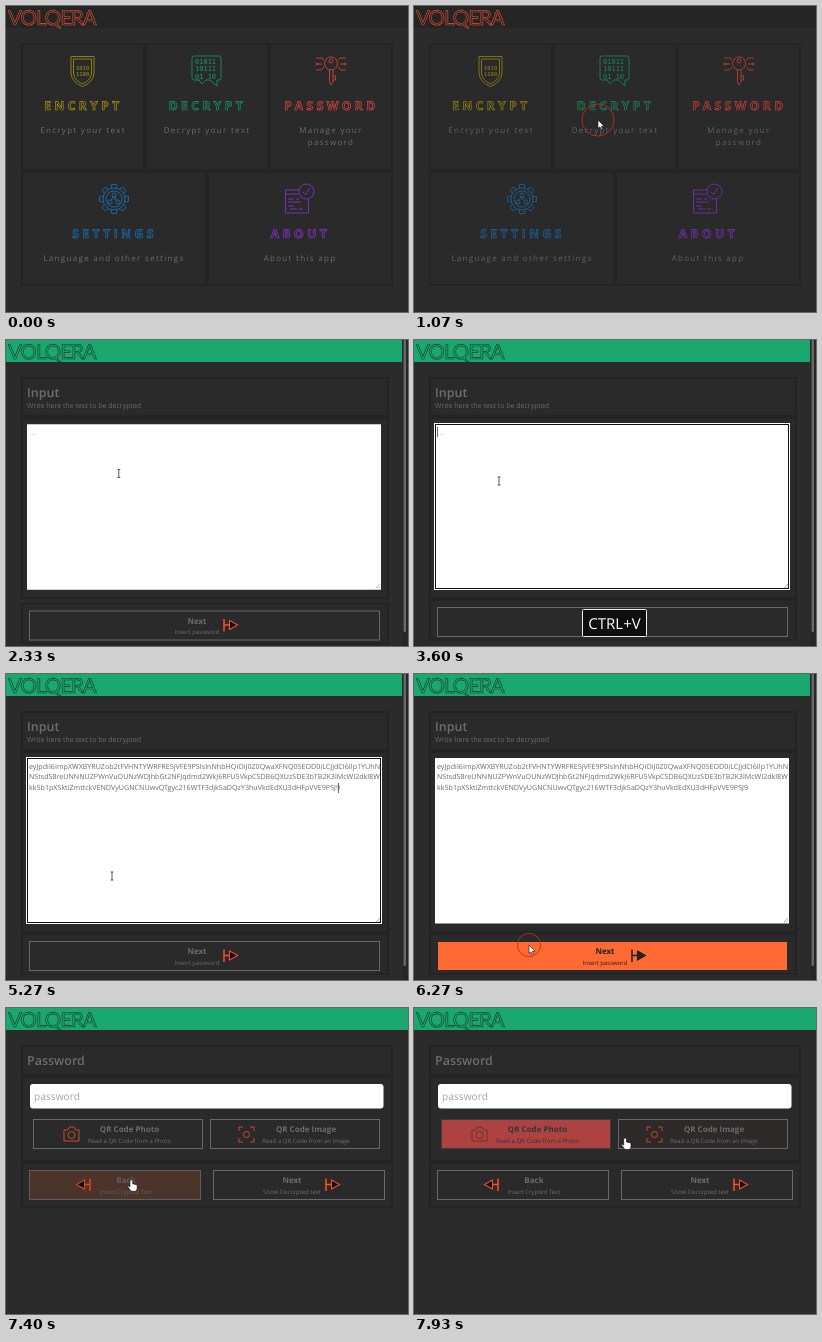
Animation, 402 px wide and 306 px high, one loop 8 s. Source, as an HTML page:

```html
<!DOCTYPE html>
<html lang="en">
<head>
<meta charset="utf-8">
<title>Text encryption app</title>
<style>
html, body { margin: 0; width: 100%; height: 100%; overflow: hidden; background: #2b2b2b; }
svg { display: block; width: 402px; height: 306px; font-family: "Open Sans", "Noto Sans", sans-serif; text-rendering: geometricPrecision; }
.panel { fill: #2a2a2a; stroke: #242424; stroke-width: 2; }
.line { fill: none; stroke-width: .8; }
.mid { text-anchor: middle; }
.gray { fill: #6c6c6c; }
.note { font-size: 8px; letter-spacing: 1.3px; }
.card { font-size: 12px; font-weight: 700; letter-spacing: 3.5px; stroke-width: .7; fill: #2a2a2a; }
.bits { font-family: "DejaVu Sans Mono", monospace; stroke: none; }
.head { font-size: 12.5px; font-weight: 600; }
.name { font-size: 8px; font-weight: 700; }
.hint { font-size: 6px; }
</style>
</head>
<body>
<svg id="stage" viewBox="0 0 402 306"></svg>
<script>
const LOOP = 8000, RED = '#f4502f', PASTE = 3730, PRESS = 6190;
const stage = document.getElementById('stage');

const panel = (x, y, w, h, id = '') => `<rect id="${id}" class="panel" x="${x}" y="${y}" width="${w}" height="${h}"/>`;
const text = (x, y, s, cls, extra = '') => `<text x="${x}" y="${y}" class="${cls}" ${extra}>${s}</text>`;
const group = (id, inner) => `<g id="${id}">${inner}</g>`;
const at = (x, y, inner, flip = '', extra = '') => `<g transform="translate(${x} ${y}) ${flip}" ${extra}>${inner}</g>`;

// Menu card: icon, outlined title, note lines
function card(x, y, w, h, color, icon, ix, title, ...notes) {
  const c = x + w / 2, low = y + 66;
  return panel(x, y, w, h) +
    at(ix, y + 12, icon(color), '', `class="line" stroke="${color}"`) +
    text(c + 0.5, low, title, 'card mid', `stroke="${color}"`) +
    notes.map((s, i) => text(c, low + 23 + 12 * i, s, 'note gray mid')).join('');
}

const bits = (x, y, size, color, ...rows) =>
  rows.map((s, i) => text(x, y + i * size * 1.1, s, 'bits', `font-size="${size}" fill="${color}"`)).join('');
const teeth = Array.from({length: 8}, (_, i) => `<path transform="rotate(${i * 45} 15 15)" d="M12 4.5L12.6 .5H17.4L18 4.5"/>`).join('');

const shield = c => '<path d="M.5 .5H23.5V17Q23 26 12 30.5Q1 26 .5 17ZM3 3H21V17Q20.5 24 12 28Q3.5 24 3 17Z"/>' +
  bits(5.5, 14, 5.5, c, '1010', '1100');
const bubble = c => '<path d="M8 24H2Q0 24 0 22V2Q0 0 2 0H27Q29 0 29 2V22Q29 24 27 24H25V30L18 24H14L10 28L7 24"/>' +
  bits(3, 7.5, 7, c, '01011', '10111', '01 10');
const key = () => '<path d="M13.5 14V26L15 29L17 26V14M17 20H19.5V24H17M0 2H6L8 4M2 8H6M0 14H5L8 11M30 2H24L22 4M28 8H24M30 14H25L22 11"/>' +
  '<circle cx="15" cy="7.5" r="6.5"/><circle cx="15" cy="5" r="2"/><circle cx="1" cy="8" r="1"/><circle cx="29" cy="8" r="1"/>';
const gear = () => '<circle cx="15" cy="15" r="11"/><circle cx="15" cy="15" r="8"/>' + teeth +
  '<circle cx="15" cy="11" r="2"/><circle cx="11" cy="18" r="2"/><circle cx="19" cy="18" r="2"/><path d="M15 13V16M12 16L14 13M18 16L16 13"/>';
const sheet = () => '<path d="M14 6H.5V29H23.5V15M.5 10H13M3 15H9M11 15H14M3 18H16M3 22H9M5 25H12M14 25H18"/>' +
  '<circle cx="21.5" cy="7.5" r="7.5"/><path d="M18 8L20.5 10.5L25 4"/>';

const arrow = (c, fill) => `<path d="M1 .5V13M1 6.5H8" stroke="${c}" stroke-width="1.5"/><path d="M6.5 2L14.5 6.5L6.5 11Z" fill="${fill}" stroke="${c}" stroke-width="1.1"/>`;
const camera = c => `<path class="line" stroke="${c}" d="M0 3H4L5.5 0H10L11.5 3H15V14H0Z"/><circle class="line" stroke="${c}" cx="7.5" cy="8" r="3.5"/>`;
const scan = c => `<path class="line" stroke="${c}" d="M0 4V0H4M11 0H15V4M15 11V15H11M4 15H0V11"/><circle class="line" stroke="${c}" cx="7.5" cy="7.5" r="3"/>`;

// A button holds a plain look and a hover look on top of it
function button(id, x, y, w, h, c, title, hint, icon, ix, hot, flip = '') {
  const look = (ink, mark, fill) =>
    text(c, y + 13, title, 'name mid', `fill="${ink}"`) + text(c, y + 23.5, hint, 'hint mid', `fill="${ink}"`) +
    at(ix, y + 8, icon(mark, fill), flip);
  const box = paint => `<rect x="${x + .5}" y="${y + .5}" width="${w - 1}" height="${h - 1}" ${paint}/>`;
  return box('fill="none" stroke="#686868"') + look('#6c6c6c', RED, '#000') +
    group(id, box(`fill="${hot}" stroke="#2b2b2b"`) + look('#222', '#222', '#222'));
}

const cipher = [
  'eyJpdiI6ImpXWXBYRUZob2tFVHNTYWRFRE5jVFE9PSIsInNhbHQiOiJ0Z0QwaXFNQ05EOD0iLCJjdCI6Ilp1YUhN',
  'NStsdS8reUNNNUZPWnVuOUNzWDJhbGt2NFJqdmd2WkJ6RFU5VkpCSDB6QXUzSDE3bTB2K3lMcWI2dkl8W',
  'kk5b1pXSktiZmttckVENDVyUGNCNUwvQTgyc216WTF3djk5aDQzY3huVkdEdXU3dHFpVVE9PSJ9'
];

const menu =
  card(16, 38, 122, 126, '#a8960c', shield, 64.5, 'ENCRYPT', 'Encrypt your text') +
  card(140, 38, 122, 126, '#159c69', bubble, 186, 'DECRYPT', 'Decrypt your text') +
  card(264, 38, 122, 126, '#e5453d', key, 310, 'PASSWORD', 'Manage your', 'password') +
  card(16, 166, 184, 113, '#1673bd', gear, 93, 'SETTINGS', 'Language and other settings') +
  card(202, 166, 184, 113, '#8c32dc', sheet, 279, 'ABOUT', 'About this app');

const input =
  group('in0', panel(16, 38, 366, 38) + text(21, 57, 'Input', 'head gray') +
    text(21, 68, 'Write here the text to be decrypted', 'gray', 'font-size="7"')) +
  group('in1', panel(16, 78, 366, 180) +
    '<rect x="21" y="84" width="354" height="165.5" fill="#fff"/>' +
    '<g id="focus" fill="none"><rect x="20.5" y="83.5" width="355" height="166" stroke="#fff"/><rect x="21.5" y="84.5" width="353" height="164" stroke="#111"/></g>' +
    '<path d="M370 248L374 244M372.5 248L374 246.5" stroke="#888" stroke-width=".7"/>' +
    text(24, 94.6, '...', '', 'id="dots" font-size="7" fill="#aaa"') +
    group('paste', cipher.map((s, i) => text(23, 94.6 + i * 10.7, s, '', 'font-size="7.13" fill="#6a6a6a"')).join('')) +
    '<rect id="caret" width="1" height="10" fill="#666"/>') +
  group('in2', panel(16, 260, 366, 40) +
    button('hotNext', 23, 267, 351, 30, 191, 'Next', 'Insert password', arrow, 217, '#ff6a33'));

const password =
  group('pw0', panel(16, 38, 370, 29) + text(21, 56.5, 'Password', 'head gray')) +
  group('pw1', panel(16, 69, 370, 84, 'pwBox') + '<rect x="24" y="76" width="353.5" height="24.5" rx="3" fill="#fff"/>' +
    text(28, 92, 'password', '', 'font-size="10.2" fill="#a0a3aa"') +
    group('pw2',
      button('hotPhoto', 27, 111, 170, 30, 123.5, 'QR Code Photo', 'Read a QR Code from a Photo', camera, 58, '#e04c4c') +
      button('hotImage', 204, 111, 170, 30, 300, 'QR Code Image', 'Read a QR Code from an Image', scan, 233, '#e04c4c'))) +
  group('pw3', panel(16, 155, 370, 44) +
    button('hotBack', 23, 162, 172, 30, 120, 'Back', 'Insert Crypted Text', arrow, 85, '#ff6a33', 'scale(-1 1)') +
    button('hotShow', 207, 162, 172, 30, 286, 'Next', 'Show Decrypted text', arrow, 319, '#ff6a33'));

stage.innerHTML =
  '<rect width="402" height="306" fill="#2b2b2b"/>' +
  group('menu', menu) + group('input', input) + group('password', password) +
  '<rect id="bar" width="402" height="22"/>' +
  text(2, 18.5, 'VOLQERA', '', 'id="logo" font-family="Lato, sans-serif" font-size="20.5" letter-spacing="-1" fill="none" stroke-width=".6"') +
  group('scroll', '<rect x="396" width="6" height="306" fill="#272727"/><rect x="397.5" width="2.5" height="292" rx="1" fill="#686868"/>') +
  group('keys', '<rect x="168.5" y="269.5" width="64" height="27" rx="1" fill="#0c0c0c" fill-opacity=".93" stroke="#eee"/>' +
    text(200.5, 288.5, 'CTRL+V', 'mid', 'font-size="15" fill="#fff"')) +
  '<circle id="ring" fill="none" stroke="#c0300f" stroke-width=".9"/>' +
  group('cursor',
    group('arrow', '<path d="M0 0V8.5L2 6.8L3.3 9.6L4.6 9L3.4 6.3H6Z" fill="#fff" stroke="#111" stroke-width=".6"/>') +
    group('beam', '<path d="M-1.5 -4H1.5M0 -4V4M-1.5 4H1.5" fill="none" stroke="#333" stroke-width=".8"/>') +
    group('hand', '<path d="M0 0Q1.5 0 1.5 1V4L6 5V9L5 11.5H0L-3.5 7Q-3 5.5 -1.3 7V1Q-1.3 0 0 0Z" fill="#fff" stroke="#111" stroke-width=".7"/>'));

const el = {};
stage.querySelectorAll('[id]').forEach(e => { if (e.id) el[e.id] = e; });

const part = (t, from, span) => Math.min(1, Math.max(0, (t - from) / span));
const out = p => 1 - (1 - p) * (1 - p);
const smooth = p => p * p * (3 - 2 * p);
const mix = (a, b, p) => a + (b - a) * p;
const blend = (a, b, p) => `rgb(${a.map((v, i) => Math.round(mix(v, b[i], p)))})`;
const alpha = (id, v) => {
  el[id].style.opacity = v;
  el[id].style.display = v > 0 ? '' : 'none';
};
const rise = (id, p, dist, gain = 1.5) => {
  alpha(id, Math.min(1, out(p) * gain));
  el[id].setAttribute('transform', `translate(0 ${dist * (1 - out(p))})`);
};

// time, x, y of the pointer
const path = [
  [70, 200, 214], [870, 184, 114], [1830, 184, 114], [2600, 85, 141], [5000, 85, 141],
  [5270, 106, 202], [5800, 115, 271], [6400, 115, 271], [6530, 116, 268], [6780, 112, 193],
  [7270, 112, 193], [7600, 150, 132], [7930, 211, 130], [LOOP, 211, 130]
];

function pointer(t) {
  const i = Math.max(1, path.findIndex(k => k[0] > t));
  const [a, b] = [path[i - 1], path[i]];
  const p = smooth(part(t, a[0], b[0] - a[0]));
  return [mix(a[1], b[1], p), mix(a[2], b[2], p)];
}

function draw(t) {
  alpha('menu', 1 - part(t, 1000, 430));
  const green = part(t, 1070, 660);
  el.bar.setAttribute('fill', blend([37, 37, 37], [26, 168, 112], green));
  el.logo.setAttribute('stroke', blend([240, 80, 50], [24, 52, 40], green));
  alpha('scroll', +(t >= 1690 && t < 6460));

  alpha('input', t < 1760 ? 0 : 1 - part(t, 6300, 160));
  ['in0', 'in1', 'in2'].forEach((id, i) => rise(id, part(t, 1760 + 180 * i, 460), 12));
  const pasted = t >= PASTE;
  alpha('dots', +!pasted);
  alpha('paste', +pasted);
  alpha('focus', +(t >= 2340 && t < PRESS));
  const since = t - (pasted ? PASTE : 2340);
  alpha('caret', +(since >= 0 && t < PRESS && Math.floor(since / 530) % 2 === 0));
  el.caret.setAttribute('x', pasted ? 332 : 23);
  el.caret.setAttribute('y', pasted ? 109 : 87);
  alpha('keys', part(t, 3440, 140) - part(t, 4700, 230));

  alpha('password', +(t >= 6460));
  rise('pw0', part(t, 6400, 400), 15, 2);
  rise('pw1', part(t, 6400, 400), 10, 2);
  el.pwBox.setAttribute('height', mix(38, 84, out(part(t, 6540, 260))));
  alpha('pw2', part(t, 6580, 420));
  rise('pw3', part(t, 6640, 430), 8);

  alpha('hotNext', part(t, 5640, 220));
  alpha('hotBack', part(t, 7370, 200) - part(t, 7470, 220));
  alpha('hotPhoto', part(t, 7520, 200) - part(t, 7865, 240));
  alpha('hotImage', part(t, 7925, 250));
  alpha('hotShow', 0);

  const [x, y] = pointer(t);
  el.cursor.setAttribute('transform', `translate(${x} ${y})`);
  alpha('cursor', +(t >= 70));
  const beam = t >= 2050 && t < 5640, hand = t >= 7390;
  alpha('beam', +beam);
  alpha('hand', +hand);
  alpha('arrow', +!(beam || hand));

  const age = t - (t < 3000 ? 930 : PRESS);
  alpha('ring', +(age >= 0 && age < 150));
  el.ring.setAttribute('cx', x);
  el.ring.setAttribute('cy', y);
  el.ring.setAttribute('r', Math.max(0, 5.5 + age * .075));
}

const start = performance.now();
function tick() {
  draw((performance.now() - start) % LOOP);
  requestAnimationFrame(tick);
}
tick();
</script>
</body>
</html>
```
